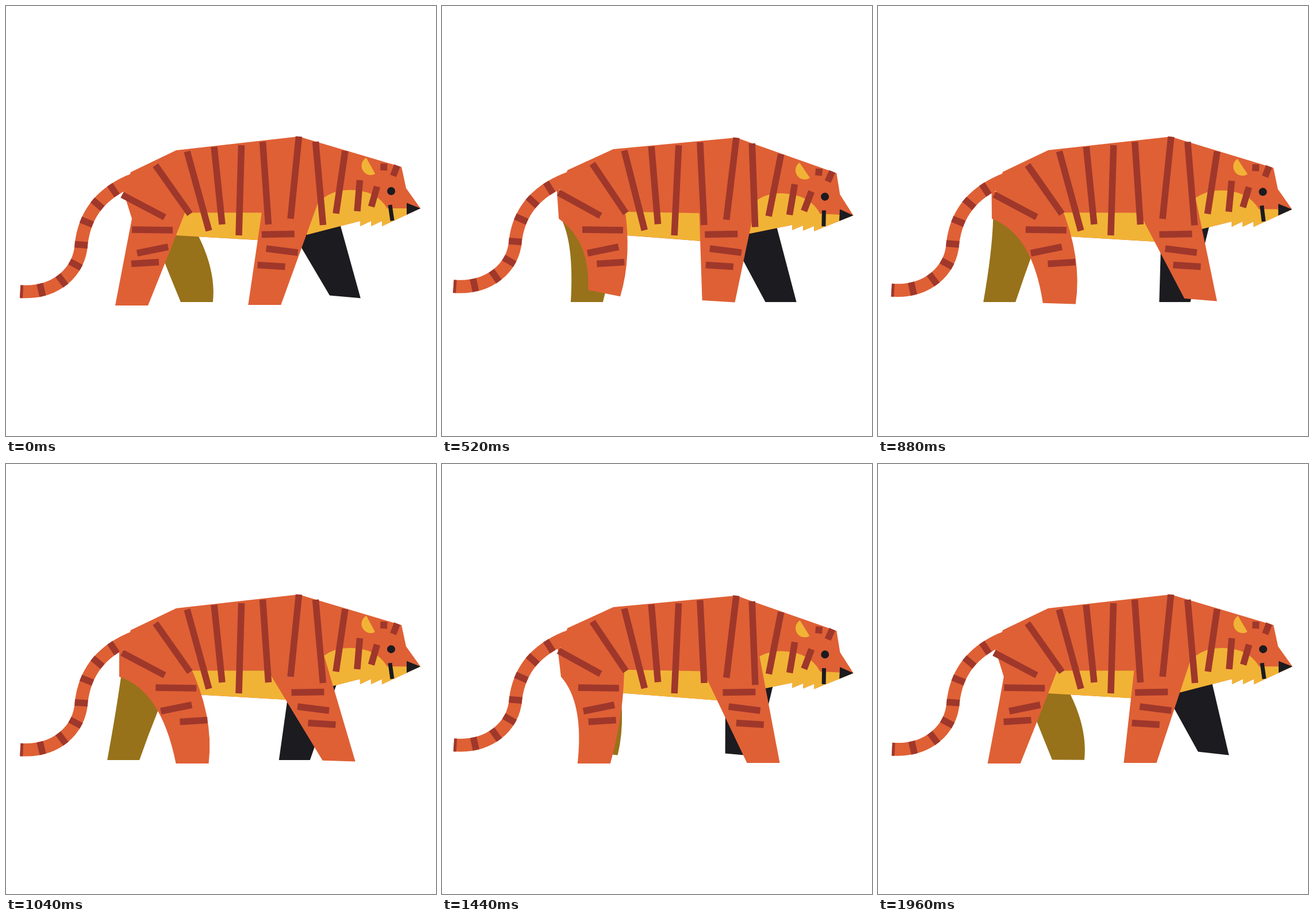
Animation, 748 px wide and 748 px high, one loop 2000 ms. Source, as an HTML page with a canvas:

```html
<!DOCTYPE html>
<html lang="en">
<head>
<meta charset="utf-8">
<title>Walking tiger</title>
<style>
  html, body { margin: 0; width: 100%; height: 100%; overflow: hidden; background: #fff; }
  canvas { display: block; width: 100%; height: 100%; }
</style>
</head>
<body>
<canvas id="stage" width="748" height="748"></canvas>
<script>
const ctx = document.getElementById('stage').getContext('2d');
const ORANGE = '#df6035', RED = '#9f372b', YELLOW = '#f1b336', BLACK = '#1c1b20', OLIVE = '#97721a';
const LOOP = 2000, STEP = 40, DEG = Math.PI / 180;

// Eased 0..1 bob, twice per stride
const wave = (t, lag) => (1 - Math.cos(2 * Math.PI * (t - lag) / 1000)) / 2;
const easeOut = (s, p) => 1 - Math.pow(1 - s, p);

// Progress of t through a window that may run past the loop end; outside 0..1 when not in it
const within = (t, from, to) => ((t - from + LOOP) % LOOP) / (to - from);

// Foot sole of width w: lifts off the floor in a window, heel higher than toe
function sole(t, x, w, floor, height, from, to) {
  const s = within(t, from, to);
  const lift = s < 1 ? height * Math.sin(Math.PI * s) ** 2 : 0;
  const dip = 0.42 * lift;
  return { x, y: floor - lift, x2: x + Math.sqrt(w * w - dip * dip), y2: floor - lift + dip };
}

// Front feet swing like a pendulum with a slight skew
function swing(t, mid, reach, phase, skew, skewPhase) {
  const a = t / LOOP * 360;
  return mid + reach * Math.cos((a - phase) * DEG) + skew * Math.cos((2 * a - skewPhase) * DEG);
}

// Hind feet push off quickly and settle at each end of the stride
function stride(t, a, b, from, to) {
  const s = within(t, from, to);
  if (s < 1) return a + (b - a) * easeOut(s, 1.38);
  return b + (a - b) * easeOut(within(t, to, from + LOOP), 1.62);
}

function poly(color, ...p) {
  ctx.fillStyle = color;
  ctx.beginPath();
  for (let i = 0; i < p.length; i += 2) ctx.lineTo(p[i], p[i + 1]);
  ctx.closePath();
  ctx.fill();
}

function bar(x1, y1, x2, y2, w = 11.5, color = RED) {
  ctx.strokeStyle = color;
  ctx.lineWidth = w;
  ctx.beginPath();
  ctx.moveTo(x1, y1);
  ctx.lineTo(x2, y2);
  ctx.stroke();
}

function turned(x, y, angle, draw) {
  ctx.save();
  ctx.translate(x, y);
  ctx.rotate(angle);
  ctx.translate(-x, -y);
  draw();
  ctx.restore();
}

function spunBar(angle, x1, y1, x2, y2, w, color) {
  turned((x1 + x2) / 2, (y1 + y2) / 2, angle, () => bar(x1, y1, x2, y2, w, color));
}

function bezier(p, s) {
  const r = 1 - s;
  const mix = k => r * r * r * p[0][k] + 3 * r * r * s * p[1][k] + 3 * r * s * s * p[2][k] + s * s * s * p[3][k];
  const dir = k => r * r * (p[1][k] - p[0][k]) + 2 * r * s * (p[2][k] - p[1][k]) + s * s * (p[3][k] - p[2][k]);
  return { x: mix(0), y: mix(1), a: Math.atan2(dir(1), dir(0)) };
}

function tail(t) {
  const g = wave(t, 60), half = 11.3;
  const pt = (x, y, dx, dy) => [x + dx * g, y + dy * g];
  const mid = pt(131, 415, -3.5, -6);
  const low = [pt(25, 497, -5, -9.5), pt(88, 501, -6, -8.5), pt(128, 462, -4, -7), mid];
  const high = [mid, pt(137, 361, -3, -5.5), pt(166, 327, -1, -4.5), pt(214, 305.5, 1, -3.5)];
  ctx.strokeStyle = ORANGE;
  ctx.lineWidth = 2 * half;
  ctx.beginPath();
  ctx.moveTo(...low[0]);
  ctx.bezierCurveTo(...low[1], ...low[2], ...low[3]);
  ctx.bezierCurveTo(...high[1], ...high[2], ...high[3]);
  ctx.lineTo(high[3][0] + 16, high[3][1] - 6);
  ctx.stroke();
  const band = (curve, s, w) => {
    const { x, y, a } = bezier(curve, s);
    const nx = -Math.sin(a) * half, ny = Math.cos(a) * half;
    bar(x - nx, y - ny, x + nx, y + ny, w);
  };
  band(low, 0.012, 5);
  for (let i = 0; i < 4; i++) band(low, 0.21 + i * 0.262, 11.5);
  for (let i = 1; i < 4; i++) band(high, i * 0.265, 11.5);
}

// Hind legs bend more the further forward the foot is; u is 0 at the back, 1 at the front
function nearHind(foot, u, rump) {
  ctx.fillStyle = ORANGE;
  ctx.beginPath();
  ctx.moveTo(204 - 7 * u, rump);
  ctx.lineTo(219 - 32 * u + 10 * u * u, 370);
  ctx.quadraticCurveTo(207 + 115 * u - 52 * u * u, 432 - 38 * u, foot.x, foot.y);
  ctx.lineTo(foot.x2, foot.y2);
  ctx.quadraticCurveTo(283 + 79 * u, 432 + 5 * u, 317, 345);
  ctx.fill();
}

function farHind(foot) {
  const u = (foot.x - 174) / 105;
  ctx.fillStyle = OLIVE;
  ctx.beginPath();
  ctx.moveTo(200 + 32 * u * u, 370);
  ctx.quadraticCurveTo(190 + 105 * u - 44 * u * u, 428 - 30 * u, foot.x, foot.y);
  ctx.lineTo(foot.x2, foot.y2);
  ctx.quadraticCurveTo(259 + 88 * u, 432 + 5 * u, 301, 345);
  ctx.fill();
}

function frontLeg(color, foot, lx, ly, rx, ry) {
  poly(color, lx, ly, rx, ry, foot.x2, foot.y2, foot.x, foot.y);
}

function headShape() {
  const beard = [];
  for (let x = 654; x > 600; x -= 19) beard.push(x, 383, x, 374);
  poly(ORANGE, 509, 227, 688, 280, 696, 317, 721, 352, ...beard, 523, 398, 512, 380);
  ctx.fillStyle = YELLOW;
  ctx.beginPath();
  ctx.moveTo(523, 398);
  ctx.lineTo(534, 354);
  ctx.quadraticCurveTo(556, 320, 598, 320);
  ctx.quadraticCurveTo(644, 320, 663, 352);
  ctx.lineTo(721, 352);
  for (let i = 0; i < beard.length; i += 2) ctx.lineTo(beard[i], beard[i + 1]);
  ctx.fill();
  poly(BLACK, 697, 342.5, 721, 352, 697, 363);
}

function face(t, h) {
  bar(538.5, 236, 551.5, 381);
  bar(590, 252, 574, 361);
  spunBar(2 * DEG * h, 615.5, 303, 611, 357);
  spunBar(2 * DEG * h, 645.5, 314, 635.5, 349);
  bar(657.5, 274, 657, 286, 12);
  bar(680.5, 277.5, 673.5, 295.5);
  spunBar(6.5 * DEG * h, 668, 346, 672, 373.5, 7, BLACK);
  ctx.fillStyle = BLACK;
  ctx.beginPath();
  ctx.arc(670, 322, 7, 0, 7);
  ctx.fill();
  ctx.fillStyle = YELLOW;
  const tilt = (63.5 - 13 * wave(t, 150)) * DEG;
  ctx.beginPath();
  ctx.arc(634.5 - 2 * h, 278, 16, tilt, tilt + Math.PI);
  ctx.fill();
}

function draw(t) {
  const h = wave(t, 0);
  const body = fn => turned(402, 357, 0.0195 * h, fn);
  const head = fn => turned(482, 252, 0.052 * h, fn);

  const hind = sole(t, stride(t, 190, 296, 0, 1060), 57, 521, 27, 0, 1010);
  const backHind = sole(t, stride(t, 304, 174, 10, 1030), 56, 515, 16, 1040, 2020);
  const front = sole(t, swing(t, 484.5, 73, 210, 4.5, 270), 57, 520, 14, 260, 1220);
  const backFront = sole(t, swing(t, 526, 55, 38.4, 9.3, 131), 54, 515, 26, 1200, 2240);
  const u = (hind.x - 190) / 105, v = front.x - 422;

  ctx.fillStyle = '#fff';
  ctx.fillRect(0, 0, 748, 748);

  tail(t);
  farHind(backHind);
  frontLeg(BLACK, backFront, 493, 385, 579, 372);

  head(headShape);
  body(() => {
    poly(ORANGE, 217, 289, 296, 251, 509, 227, 530, 234, 530, 340, 518, 400, 505, 411, 295, 399, 230, 345, 204, 322);
    poly(YELLOW, 300, 359.5, 470, 359.5, 500, 410.8, 280, 398);
  });
  nearHind(hind, u, 322 - 3 * h);
  frontLeg(ORANGE, front, 447, 345, 550, 322);

  body(() => {
    bar(202, 328.5, 276, 367.5);
    bar(260, 277, 320, 362);
    bar(315, 253, 353, 391);
    bar(362, 245, 376, 380);
    bar(409.5, 242, 405, 399);
    bar(446.5, 236, 456.5, 380);
    bar(509.5, 227, 495, 370);
  });
  head(() => face(t, h));

  // Leg stripes slide with the foot, the lower the further
  const legBar = (dx, x, y, w, drop) => bar(x + dx, y, x + dx + w, y + drop);
  legBar(41 * u, 219, 389, 71, 1);
  legBar(41 * u, 228, 430, 54, -11);
  legBar(84 * u, 218, 448.5, 48, -3);
  legBar(0.4 * v, 445, 397.5, 57, -1);
  legBar(0.42 * v, 453, 422, 55, 7);
  legBar(0.68 * v, 438, 450.5, 48, 3);
}

const start = performance.now();
function tick() {
  const t = (performance.now() - start) % LOOP;
  draw(Math.floor(t / STEP) * STEP);
  requestAnimationFrame(tick);
}
tick();
</script>
</body>
</html>
```
